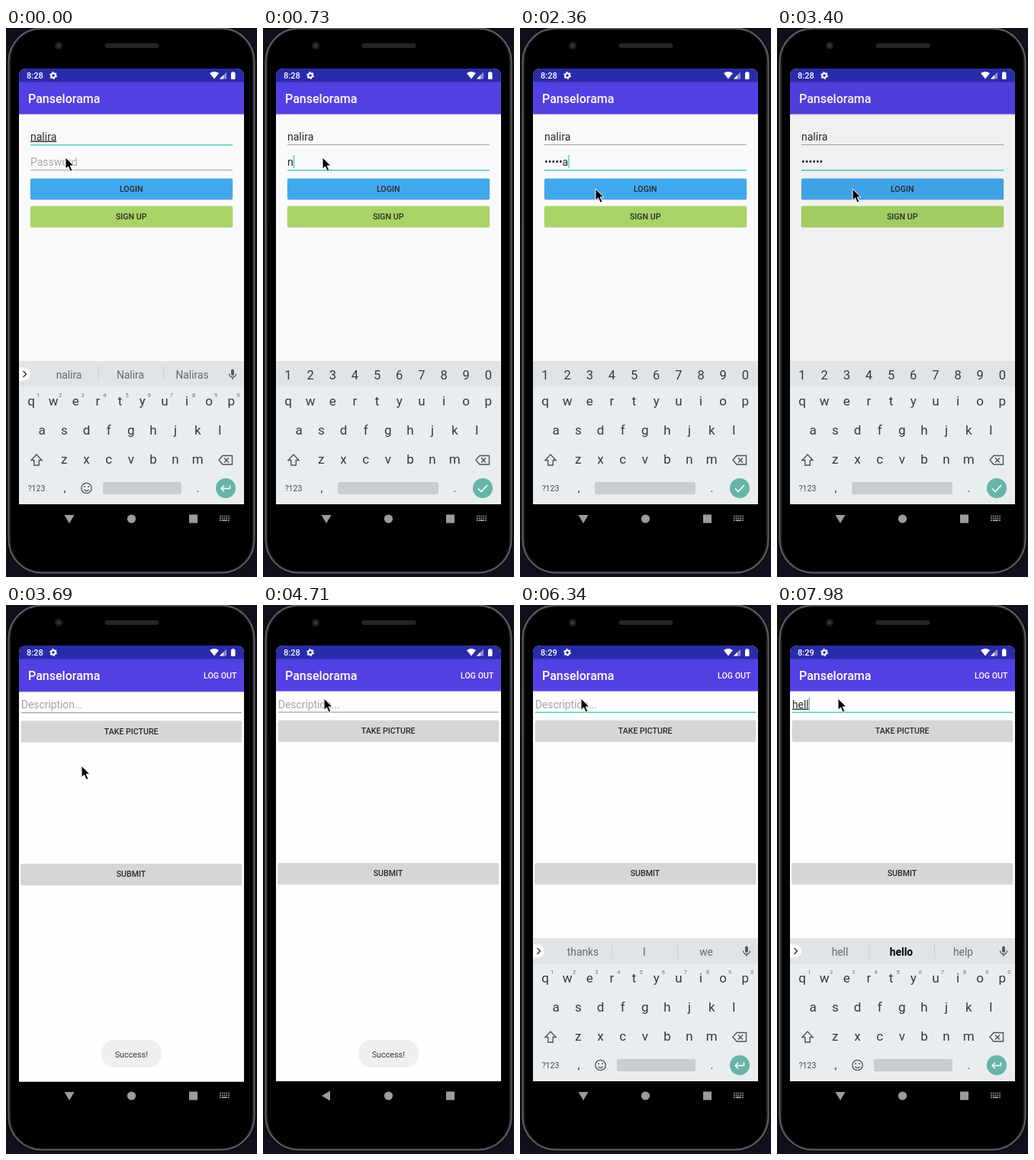
Recreate the animation shown at these times as an HTML page. Size 329 by 717 pixels, loop 8000 ms.

```html
<!DOCTYPE html>
<html lang="en">
<head>
<meta charset="utf-8">
<style>
html, body { margin: 0; width: 100%; height: 100%; overflow: hidden; background: #120f1c; }
svg { display: block; width: 329px; height: 717px; font-family: Roboto, sans-serif; }
</style>
</head>
<body>
<svg id="stage" viewBox="0 0 329 717"></svg>
<script>
const LOOP = 8000, TEAL = '#4fd0c0', COLUMN = 29.15;
const USER = 'nalira', TITLE = 'Panselorama';
const stage = document.getElementById('stage');

const rect = (x, y, w, h, fill, more = '') =>
  `<rect x="${x}" y="${y}" width="${w}" height="${h}" fill="${fill}" ${more}/>`;
const text = (x, y, size, fill, string, more = '') =>
  `<text x="${x}" y="${y}" font-size="${size}" fill="${fill}" ${more}>${string}</text>`;
const mid = (x, y, size, fill, string, more = '') =>
  text(x, y, size, fill, string, 'text-anchor="middle" ' + more);
const path = (d, stroke, width = 1.4, more = '') =>
  `<path d="${d}" fill="none" stroke="${stroke}" stroke-width="${width}" ${more}/>`;
const row = (chars, x, y, size, fill = '#303b42') =>
  [...chars].map((c, i) => mid(x + COLUMN * i, y, size, fill, c)).join('');

const button = (x, y, w, fill, label) =>
  rect(x - .5, y + .5, w + 1, 28, '#000', 'rx="2.5" opacity=".13"') + rect(x, y, w, 27.5, fill, 'rx="2"') +
  mid(x + w / 2 - .3, y + 17.4, 10.6, '#2a2a2a', label, 'font-weight="500"');
const appBar = () => rect(17, 112.5, 295, 1, '#000', 'opacity=".15"') + rect(17, 60, 295, 52.5, '#5340e3') +
  text(29, 97.7, 16, '#fff', TITLE, 'font-weight="500"');

const phone = () => `
  <clipPath id="screen"><path d="M17 623V63q0-10 10-10H302q10 0 10 10V623z"/></clipPath>
  ${rect(.5, -1.5, 328, 715.5, '#0b0b0d', 'rx="46"')}
  ${rect(3.5, .5, 322, 711, '#1b1b1d', 'rx="43" stroke="#5d5f63" stroke-width="2"')}
  ${rect(6.5, 2.5, 316, 707, '#000', 'rx="40"')}
  ${rect(129.5, 20, 71, 6, '#252525', 'rx="3"')}
  <circle cx="69" cy="23" r="5" fill="#1d1e22"/><circle cx="69" cy="23" r="2.2" fill="#333b48"/>`;

const login = () => `<g id="login">${rect(17, 53, 295, 569, '#fafafa')}${appBar()}
  ${text(32, 146.5, 14, '#2a2a2a', USER, 'id="user"')}
  ${rect(32, 152, 265, 1, '#a3a3a3', 'id="userLine"')}
  ${text(32, 180, 14, '#2a2a2a', '', 'id="password"')}
  ${rect(32, 185, 265, 1, '#a3a3a3', 'id="passwordLine"')}
  ${button(32, 196.5, 265, '#40a9ee', 'LOGIN')}
  <clipPath id="loginBox">${rect(32, 196.5, 265, 27.5, '#000')}</clipPath>
  <circle id="ripple" cx="100" cy="210" fill="#000" opacity=".12" clip-path="url(#loginBox)"/>
  ${button(32, 232.5, 265, '#a9d465', 'SIGN UP')}
  ${rect(17, 53, 295, 569, '#000', 'id="dim" opacity=".04"')}</g>`;

const main = () => `<g id="main">${rect(17, 53, 295, 569, '#fefefe')}${appBar()}
  ${mid(280.7, 95.7, 10.6, '#fff', 'LOG OUT', 'font-weight="500"')}
  ${text(20, 134.5, 13.8, '#2a2a2a', '', 'id="description"')}
  ${rect(20, 139.5, 289, 1, '#8c8c8c', 'id="descriptionLine"')}
  ${button(20, 150.5, 289, '#d5d6d6', 'TAKE PICTURE')}
  ${button(19.5, 337, 289.5, '#d5d6d6', 'SUBMIT')}</g>`;

const toast = () => `<g id="toast">${rect(125, 568, 79, 36, '#efefef', 'rx="17"')}
  ${mid(164.3, 590.5, 10.8, '#3a3a3a', 'Success!')}</g>`;

const status = () => `${rect(17, 53, 295, 17.5, '#2a2ba9')}
  ${text(27, 65.8, 11, '#fff', '', 'id="clock" font-weight="500"')}
  <circle cx="62" cy="62" r="2.8" fill="none" stroke="#fff" stroke-width="2"/>
  <circle cx="62" cy="62" r="4.2" fill="none" stroke="#fff" stroke-width="1.4" stroke-dasharray="2.2"/>
  <path d="M267 59q6-4 12 0l-6 7.5z" fill="#fff"/>
  <path d="M280 66.5l9-9v9z" fill="#8b8cd0"/><path d="M280 66.5l5-5v5z" fill="#fff"/>
  ${rect(295, 58, 5.5, 9, '#fff', 'rx=".8"')}${rect(296.5, 57, 2.5, 1.5, '#fff')}`;

const keyboard = () => `<g id="keyboard">
  ${rect(17, 435, 295, 187, '#e9edf0')}${rect(17, 435, 295, 33.5, '#e0e4e7')}
  ${row('qwertyuiop', 33, 493, 17)}${row('asdfghjkl', 47.2, 531, 17)}${row('zxcvbnm', 76.3, 569, 17)}
  ${path('M40 557l7 7.5h-3.7v6.5h-6.6v-6.5H33z', '#4a555b')}
  ${path('M284 558.5h12.5v11.5H284l-5-5.75zM286 561.5l6 6m0-6l-6 6', '#4a555b')}
  ${mid(40, 604.7, 10.5, '#414c52', '?123')}${mid(77, 606, 15, '#303b42', ',')}${mid(251.5, 606, 15, '#303b42', '.')}
  ${rect(98, 593, 132, 16, '#c9cdd0', 'id="space" rx="2"')}
  <circle cx="288" cy="601" r="13" fill="#67b4a9"/>
  <g id="wordKeys">
    ${row('1234567890', 42, 481.5, 7.5, '#68737a')}
    <path d="M17 443.5h6.5a8.5 8.5 0 0 1 0 17H17z" fill="#fff"/>
    ${path('M22.5 448l4 4-4 4', '#333')}
    ${rect(120.5, 443, 1, 18, '#c9ced1')}${rect(206, 443, 1, 18, '#c9ced1')}
    ${[82.5, 163, 244].map((x, i) => mid(x, 457.5, 13.8, '#62696e', '', `id="hint${i}"`)).join('')}
    ${rect(295, 445.5, 4, 8.5, '#555e64', 'rx="2"')}${path('M292.5 451.5a4.5 4.5 0 0 0 9 0M297 456v3', '#555e64')}
    <circle cx="105.5" cy="601" r="6.7" fill="none" stroke="#4a555b" stroke-width="1.3"/>
    <g fill="#4a555b"><circle cx="103" cy="599" r="1"/><circle cx="108" cy="599" r="1"/></g>
    ${path('M102.3 603q3.2 3 6.4 0', '#4a555b', 1.2)}
    ${path('M293.5 597v4.5H282m4-4l-4 4 4 4', '#fff')}
  </g>
  <g id="digitKeys">${row('1234567890', 33, 458.5, 16.5)}${path('M282 601.5l4 4 8-8.5', '#fff', 1.7)}</g></g>`;

const nav = () => `<path id="back" d="M76.5 636h13l-6.5 11z" fill="#9c9c9c"/>
  <circle cx="164.5" cy="641" r="5.6" fill="#9c9c9c"/>${rect(240, 635.5, 11, 11, '#9c9c9c')}
  <g id="switcher">${path('M280 637.5h13M280 640.3h13', '#9c9c9c', 1.7, 'stroke-dasharray="1.7 1.1"')}
  ${path('M280 643.2h13', '#9c9c9c', 1.7, 'stroke-dasharray="1.7 1.1 7.2 1.1 1.7"')}</g>`;

const pointer = () => `<path id="pointer" d="M0 0V15.2l3.5-3.3 2.7 6.2 2.7-1.2-2.7-6h4.8z"
  fill="#000" stroke="#fff" stroke-width="1"/>`;

stage.innerHTML = phone() + `<g clip-path="url(#screen)">${login()}${main()}
  ${rect(0, 0, 1.4, 17, TEAL, 'id="caret"')}${status()}</g>` + keyboard() + toast() + nav() + pointer();

const el = Object.fromEntries([...stage.querySelectorAll('[id]')].map(e => [e.id, e]));
const set = (id, attrs) => { for (const name in attrs) el[id].setAttribute(name, attrs[name]); };
const show = (id, on) => set(id, { display: on ? 'inline' : 'none' });
const write = (id, string, fill) => { el[id].textContent = string; set(id, { fill }); };
const focusLine = (id, on, rest) => set(id, { height: on ? 1.5 : 1, fill: on ? TEAL : rest });

// Value of the last [time, value] entry already reached
const pick = (t, entries) => entries.filter(e => e[0] <= t).pop()[1];

const passwordKeys = [[0, 0], [730, 1], [880, 3], [1030, 4], [1180, 6]];
const description = [[0, ''], [7680, 'he'], [7830, 'hel'], [7980, 'hell']];
const hints = [[0, [USER, 'Nalira', 'Naliras']], [3500, ['thanks', 'I', 'we']],
  [7680, ['he', 'he’s', 'her']], [7830, ['hel', 'hello', 'help']], [7980, ['hell', 'hello', 'help']]];
const caretOn = [[0, 0], [440, 1], [1620, 0], [2070, 1], [2950, 0],
  [5740, 1], [6340, 0], [6790, 1], [7240, 0], [7680, 1]];
const keyboardPose = [[0, [0, 1]], [3545, [60, .4]], [3690, [0, 0]],
  [5285, [42, .35]], [5430, [9, .82]], [5580, [0, 1]]];
const pointerStops = [[0, [78, 169]], [1480, [90, 192]], [1620, [99, 210]]];

function draw(now) {
  const t = now % LOOP;
  const onMain = t >= 3545;

  show('login', t < 3690);
  show('main', onMain);
  set('main', { transform: `translate(0 ${pick(t, [[0, 0], [3545, 6], [3690, .7], [3835, 0]])})` });
  show('dim', t >= 3400);
  el.clock.textContent = t < 5740 ? '8:28' : '8:29';

  set('user', { 'text-decoration': t < 140 ? 'underline' : 'none' });
  focusLine('userLine', t < 140, '#a3a3a3');
  focusLine('passwordLine', t >= 140, '#a3a3a3');
  const count = pick(t, passwordKeys);
  const masked = t >= 2950 ? '•'.repeat(6) : '•'.repeat(Math.max(0, count - 1)) + USER.slice(0, count).slice(-1);
  write('password', masked || 'Password', masked ? '#2a2a2a' : '#a8a8a8');
  set('ripple', { r: pick(t, [[0, 0], [2070, 60], [2220, 200], [2360, 0]]) });

  const typed = pick(t, description);
  write('description', typed || 'Description...', typed ? '#2a2a2a' : '#a3a3a3');
  set('description', { 'text-decoration': typed ? 'underline' : 'none' });
  focusLine('descriptionLine', t >= 4855, '#8c8c8c');

  const field = onMain ? el.description : el.password;
  const length = (onMain ? typed : masked) ? field.getComputedTextLength() : 0;
  show('caret', pick(t, caretOn));
  set('caret', { x: (onMain ? 20 : 32) + length, y: onMain ? 120.5 : 166 });

  const words = t < 290 || onMain;
  const [drop, alpha] = pick(t, keyboardPose);
  set('keyboard', { transform: `translate(0 ${drop})`, opacity: alpha });
  show('wordKeys', words);
  show('digitKeys', !words);
  set('space', { x: words ? 127 : 98, width: words ? 103 : 132 });
  pick(t, hints).forEach((word, i) => {
    const best = word === 'hello';
    write('hint' + i, word, best ? '#000' : '#62696e');
    set('hint' + i, { 'font-weight': best ? 700 : 400 });
  });

  set('toast', { opacity: pick(t, [[0, 0], [3690, 1], [5285, .5], [5430, 0]]) });
  set('back', { transform: `rotate(${pick(t, [[0, 0], [3835, 50], [3980, 90], [5285, 40], [5430, 0]])} 83 641)` });
  show('switcher', t < 3835 || t >= 5285);

  let [x, y] = pick(t, pointerStops);
  const step = 3400 + 145 * Math.floor((t - 3400) / 145);
  const p = Math.min(1, Math.max(0, (step - 3980) / 725));
  const eased = p * p * (3 - 2 * p);
  x -= 19 * eased;
  y -= 88 * eased;
  set('pointer', { transform: `translate(${x} ${y})` });
  requestAnimationFrame(draw);
}
requestAnimationFrame(draw);
</script>
</body>
</html>
```
